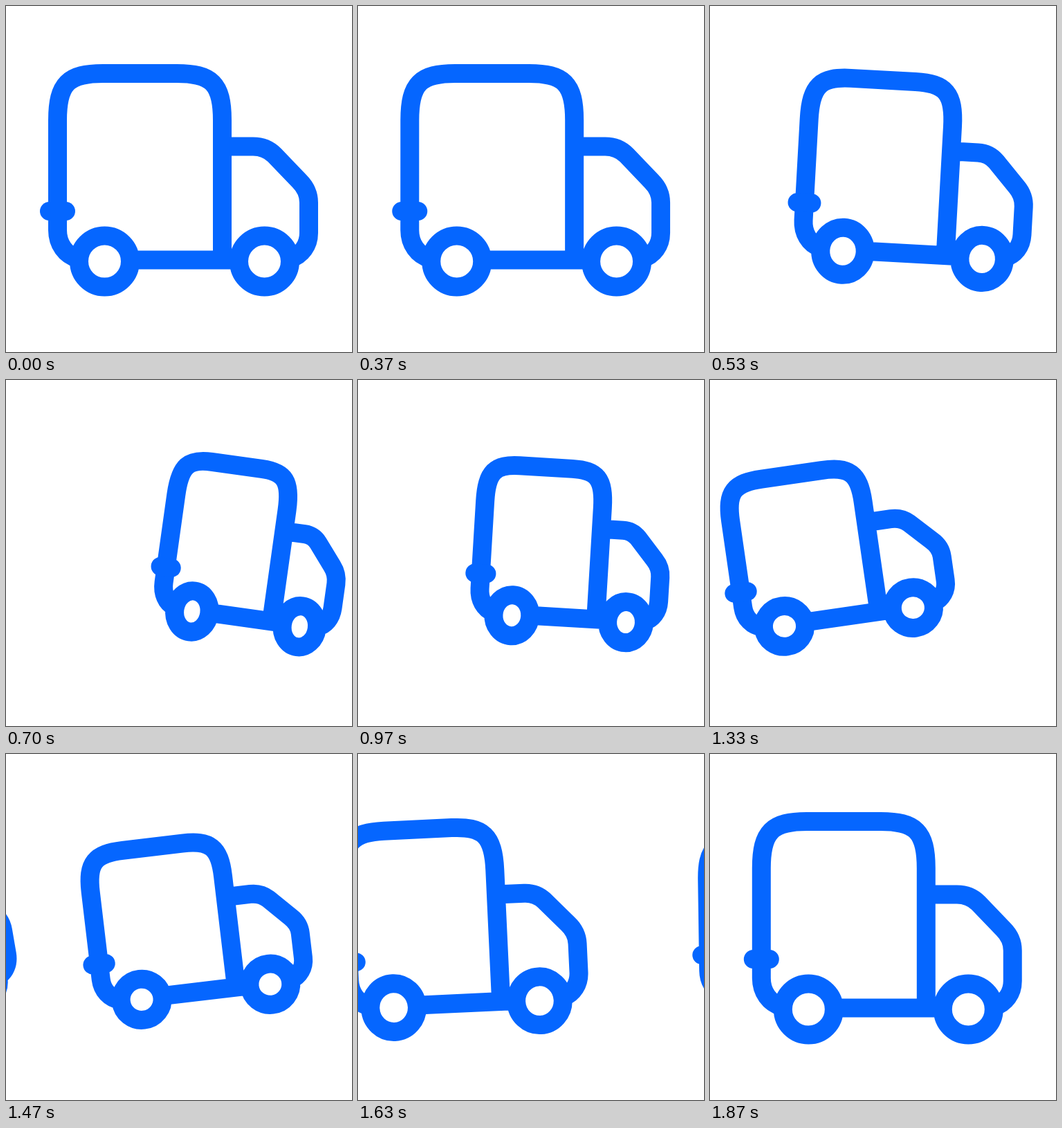
These frames come from a looping animation (500x500 px, 1900 ms). An HTML page with a canvas:

```html
<!DOCTYPE html>
<html lang="en">
<head>
<meta charset="utf-8">
<title>Delivery truck</title>
<style>
  html, body { margin: 0; width: 100%; height: 100%; overflow: hidden; background: #fff; }
  canvas { display: block; width: 100vw; height: 100vh; }
</style>
</head>
<body>
<canvas id="stage" width="500" height="500"></canvas>
<script>
const ctx = document.getElementById('stage').getContext('2d');
const LOOP = 1900;
const CENTER = 250;

const outline = new Path2D(`
  M104 365 C86 360 74.5 344 74.5 324 V165
  C74.5 112 90 97.5 140 97.5 H247
  C297 97.5 312.5 112 312.5 165 V367
  M180 367 H336
  M312.5 203 H357 C371 203 380 207.5 388 215.5
  L424 253 C433 262 437.5 272 437.5 284 V328
  C437.5 346 427 360 411 365
  M179.5 369 a37 37 0 1 0 -74 0 a37 37 0 1 0 74 0 Z
  M410.5 369 a37 37 0 1 0 -74 0 a37 37 0 1 0 74 0 Z`);
const handle = new Path2D('M62.5 296.5 H86.5');

// Times are in ticks of 1/30 s; x is the offset from the resting place.
const REST = { x: 0, turn: 0, sx: 1, sy: 1 };
const leaving = [
  { at: 10, ...REST },
  { at: 23, x: 106, turn: 8.1, sx: 0.675, sy: 0.8 },
  { at: 37.5, x: -75, turn: -8.3, sx: 0.813, sy: 0.793 },
  { at: 57, x: 575, turn: 2, sx: 0.79, sy: 0.84 }
];
const arriving = [
  { at: 35.5, x: -512, turn: -13, sx: 0.58, sy: 0.72 },
  { at: 57, ...REST }
];

const ease = p => p < 0.5 ? 4 * p ** 3 : 1 - 4 * (1 - p) ** 3;

function poseAt(keys, tick) {
  if (tick <= keys[0].at) return keys[0];
  const i = keys.findIndex(key => key.at >= tick);
  const from = keys[i - 1], to = keys[i];
  const p = ease((tick - from.at) / (to.at - from.at));
  const pose = {};
  for (const name in REST) pose[name] = from[name] + (to[name] - from[name]) * p;
  return pose;
}

// The path is transformed before stroking, so the line weight stays constant.
function strokeMoved(path, matrix, cap) {
  const moved = new Path2D();
  moved.addPath(path, matrix);
  ctx.lineCap = cap;
  ctx.stroke(moved);
}

function drawTruck({ x, turn, sx, sy }) {
  const matrix = new DOMMatrix()
    .translate(CENTER + x, CENTER)
    .rotate(turn)
    .scale(sx, sy)
    .translate(-CENTER, -CENTER);
  strokeMoved(outline, matrix, 'butt');
  strokeMoved(handle, matrix, 'round');
}

function render(now) {
  const tick = Math.floor((now % LOOP) * 0.03 + 0.11) % 57;
  ctx.fillStyle = '#fff';
  ctx.fillRect(0, 0, 500, 500);
  ctx.strokeStyle = '#0566ff';
  ctx.lineWidth = 27;
  ctx.lineJoin = 'round';
  drawTruck(poseAt(leaving, tick));
  drawTruck(poseAt(arriving, tick));
}

const start = performance.now();
function loop() {
  render(performance.now() - start);
  requestAnimationFrame(loop);
}
loop();
</script>
</body>
</html>
```
